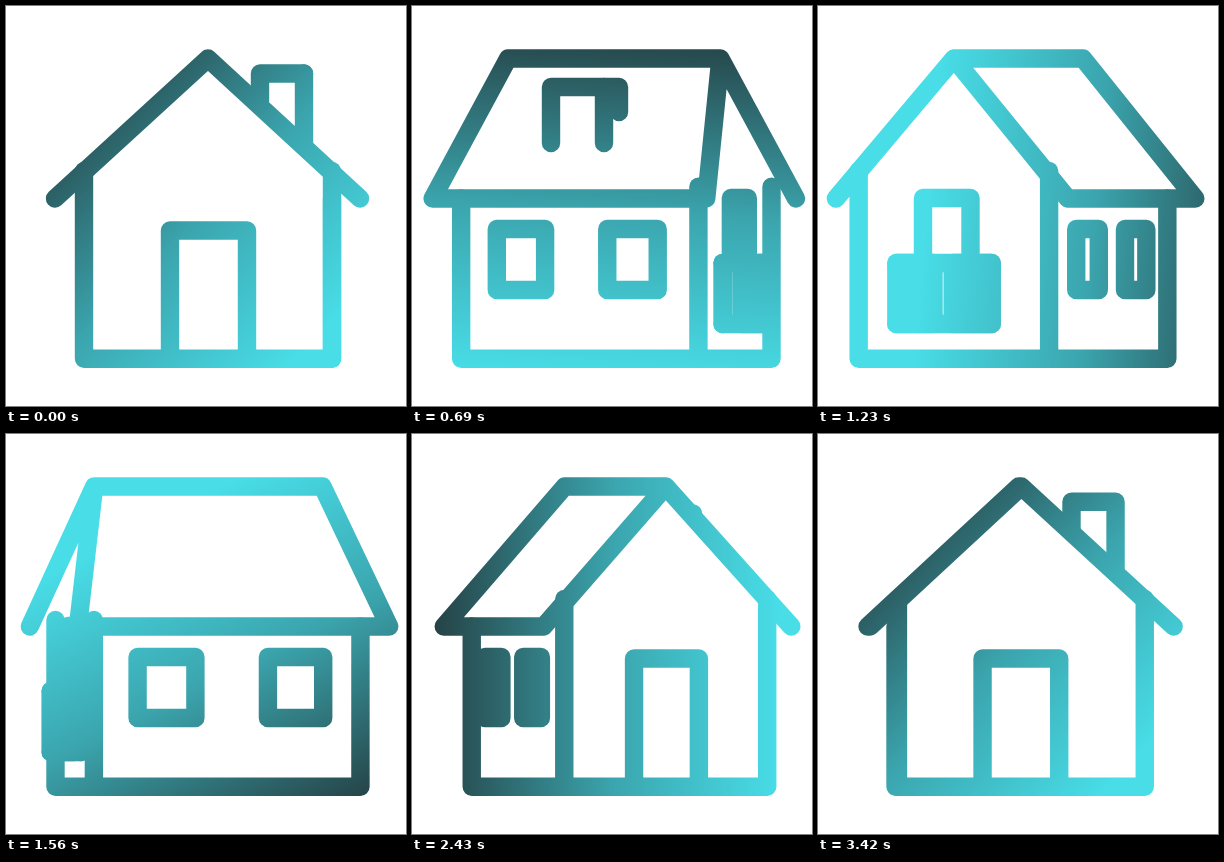
An HTML page with a canvas that plays this animation: 400x400 px, repeating every 3.45 s.

```html
<!DOCTYPE html>
<html lang="en">
<head>
<meta charset="utf-8">
<title>Turning house</title>
<style>
  html, body { margin: 0; width: 100%; height: 100%; overflow: hidden; background: #fff; }
  canvas { display: block; width: 400px; height: 400px; }
</style>
</head>
<body>
<canvas id="stage" width="400" height="400"></canvas>
<script>
const ctx = document.getElementById('stage').getContext('2d');
const LOOP = 3450, STEP = 30, AXIS = 404;
const TOP = 52.5, EAVE = 192.5, FLOOR = 352.8;

// Turn angle over time, eased smoothly through these points.
const TIMES = [0, 450, 690, 1230, 1950, 2430, 3450];
const TURNS = [0, 54.6, 108.9, 215, 301, 332.6, 360];
// Gradient: direction of the dark end, clockwise from up, and its shift that way.
const SHADE = [-45, -14, 3, 95, 206, 270, 315];
const SHIFT = [0, 0, 0, 72, 0, 0, 0];

// x positions with the gable facing us, at 45 degrees and side-on.
const POSE = {
  wallL: [78, 30, 55], wallM: [326, 204, 55], wallR: [326, 356, 354],
  ridgeL: [202, 117, 80], ridgeR: [202, 283, 326],
  eaveL: [49, 9, 28], eaveM: [354, 220, 30], eaveR: [354, 384, 383],
  doorL: [164, 87, 55], doorR: [241, 144, 55],
  winA: [336, 236, 102], winB: [336, 265, 168],
  winC: [342, 297, 252], winD: [340, 325, 315],
  crateL: [170, 86.4, 55], crateR: [233, 129.5, 53],
  boxA: [139, 61, 40], boxB: [189, 94.5, 60],
  boxC: [214, 112, 79], boxD: [264, 148, 54],
  wallTop: [165, 165, 192]
};

function lerpAt(xs, ys, x) {
  let i = 0;
  while (i < xs.length - 2 && x > xs[i + 1]) i++;
  return ys[i] + (ys[i + 1] - ys[i]) * (x - xs[i]) / (xs[i + 1] - xs[i]);
}

function smoothAt(xs, ys, x) {
  const n = xs.length - 1;
  const rate = i => (ys[i + 1] - ys[i]) / (xs[i + 1] - xs[i]);
  const slope = i => {
    if (i === 0) return rate(0) * 0.55;
    if (i === n) return rate(n - 1) * 0.9;
    const a = rate(i - 1), b = rate(i);
    return 2 * a * b / (a + b);
  };
  let i = 0;
  while (i < n - 1 && x > xs[i + 1]) i++;
  const h = xs[i + 1] - xs[i], u = (x - xs[i]) / h, v = 1 - u;
  return ys[i] * v * v * (1 + 2 * u) + ys[i + 1] * u * u * (3 - 2 * u)
    + h * (slope(i) * u * v * v - slope(i + 1) * u * u * v);
}

function gradient(turn) {
  const a = lerpAt(TURNS, SHADE, turn) * Math.PI / 180;
  const shift = lerpAt(TURNS, SHIFT, turn);
  const dx = Math.sin(a), dy = -Math.cos(a);
  const dark = 195 + shift, light = shift - 165;
  const g = ctx.createLinearGradient(202 + dark * dx, 207 + dark * dy, 202 + light * dx, 207 + light * dy);
  g.addColorStop(0, '#233a3d');
  g.addColorStop(0.54, '#3ba5ae');
  g.addColorStop(1, '#48dde7');
  return g;
}

function draw(time) {
  const turn = smoothAt(TIMES, TURNS, time);
  const half = turn % 180;
  const flip = half > 90;
  const psi = flip ? 180 - half : half;
  const back = turn > 90 && turn < 270;
  const p = {};
  for (const k in POSE) p[k] = lerpAt([0, 45, 90], POSE[k], psi);

  const trace = (mirror, pts) => {
    ctx.beginPath();
    for (const [x, y] of pts) ctx.lineTo(mirror ? AXIS - x : x, y);
  };
  const line = (...pts) => { trace(flip, pts); ctx.stroke(); };
  const rect = (l, t, r, b) => {
    trace(flip, [[l, t], [r, t], [r, b], [l, b]]);
    ctx.closePath();
    ctx.stroke();
  };
  const panel = (l, t, r, b) => { rect(l, t, r, b); ctx.fill(); };

  ctx.clearRect(0, 0, 400, 400);
  const ink = ctx.strokeStyle = gradient(turn);
  ctx.lineWidth = 18.4;
  ctx.lineCap = ctx.lineJoin = 'round';

  // Parts standing behind the house
  if (turn > 180) {
    const left = turn < 270;
    const y = 67.5 + psi * 0.44, r = 298 - psi * 0.62, l = 254 - psi * 0.7;
    trace(left, [[l, 100], [l, y], [r, y], [r, 137]]);
    ctx.stroke();
  }
  const bump = Math.min(10, (psi - 50) * 0.75);
  if (!back && bump > 0) rect(p.wallR, 257, p.wallR + bump, 318);

  trace(flip, [[p.eaveL, EAVE], [p.ridgeL, TOP], [p.ridgeR, TOP], [p.eaveR, EAVE],
    [p.wallR, EAVE], [p.wallR, FLOOR], [p.wallL, FLOOR], [p.wallL, EAVE]]);
  ctx.fillStyle = '#fff';
  ctx.fill();
  ctx.fillStyle = ink;

  // Roof
  line([p.eaveL, EAVE], [p.ridgeL, TOP], [p.eaveM, EAVE], [p.eaveR, EAVE], [p.ridgeR, TOP], [p.ridgeL, TOP]);

  // Walls
  line([p.wallL, p.wallTop], [p.wallL, FLOOR], [p.wallR, FLOOR], [p.wallR, EAVE]);
  line([p.wallM, p.wallTop], [p.wallM, FLOOR]);

  // Side windows, kept within the wall
  ctx.save();
  const edge = p.wallR + 8;
  ctx.beginPath();
  ctx.rect(flip ? AXIS - edge : 0, 0, flip ? 400 : edge, 400);
  ctx.clip();
  rect(p.winA, 223, p.winB, 284);
  rect(p.winC, 223, p.winD, 284);
  ctx.restore();

  // Gable end: crates at the back, door at the front
  if (back) {
    panel(p.boxA, 257, Math.min(p.boxB, p.boxD), 318);
    panel(Math.min(p.boxC, p.boxD), 257, p.boxD, 318);
    line([p.boxA, 257], [p.boxD, 257]);
    line([p.boxA, 318], [p.boxD, 318]);
    line([p.crateL, 257], [p.crateL, 192], [p.crateR, 192], [p.crateR, 257]);
  } else {
    line([p.doorL, FLOOR], [p.doorL, 224.5], [p.doorR, 224.5], [p.doorR, FLOOR]);
  }

  // Chimney on the near slope
  if (turn <= 180) {
    const at = (...ys) => lerpAt([0, 54.6, 108.9, 180], ys, turn);
    const near = at(298, 236, 139, 106), far = at(298, 281, 192, 106);
    const y = at(67.5, 78, 81, 67.5);
    const inner = turn < 90
      ? lerpAt([0, 54.6, 90], [254, 210, 173], turn)
      : lerpAt([90, 108.9, 180], [223, 207, 150], turn);
    trace(false, [[near, 137], [near, y], [far, y], [far, 137]]);
    ctx.stroke();
    trace(false, [[turn < 90 ? near : far, y], [inner, y], [inner, at(95, 106, 106, 95)]]);
    ctx.stroke();
  }
}

let start = null;
function frame(now) {
  if (start === null) start = now;
  const t = (now - start) % LOOP;
  draw(Math.floor(t / STEP) * STEP);
  requestAnimationFrame(frame);
}
draw(0);
requestAnimationFrame(frame);
</script>
</body>
</html>
```
